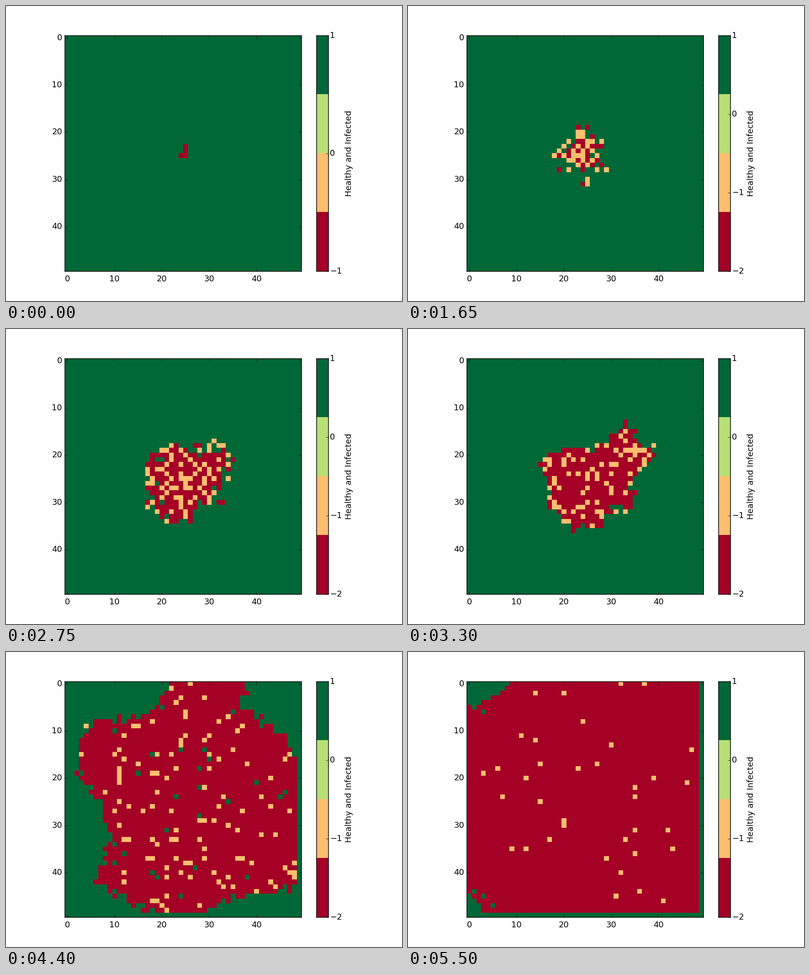
Write a matplotlib script that moves like this. It is 867 by 646 pixels and loops after 6.05 s.

```python
import numpy as np
import matplotlib.pyplot as plt
from matplotlib.animation import FuncAnimation
from matplotlib.path import Path

W, H, DPI = 867, 646, 128
N, STEPS, STEP_MS = 50, 11, 550
RED, TAN, GREEN = 0, 1, 3
PX = 72 / DPI
CMAP = plt.get_cmap("RdYlGn", 4)

xx, yy = np.meshgrid(np.arange(N), np.arange(N))
wall = (xx == N - 1) | (yy == N - 1)
rng = np.random.default_rng(7)

# Key points around the infected patch, in cell coordinates
SMALL = [(22, 17.6), (25.4, 17.6), (26.4, 21), (31.4, 20.6), (31.4, 24.4),
         (27.4, 25.5), (29.4, 28.4), (22.4, 33.4), (20.6, 28.6),
         (16.6, 27.4), (19.5, 22)]
MEDIUM = [(33.5, 13.6), (35.4, 17), (39.5, 20), (34.5, 25), (34, 31.6),
          (28.4, 32), (28, 35.4), (21.6, 35), (16.8, 31), (16.6, 25),
          (14.5, 21.6), (20, 18.5), (27, 18)]
LARGE = [(20, 11.5), (23, 13.6), (28.4, 11.6), (30, 16.5), (37.4, 14.6),
         (40.4, 20), (37, 28), (34.5, 34.4), (26, 37.4), (14, 34.4),
         (13.5, 25), (9.6, 19.5), (13, 14)]
WIDE = [(22.6, -1), (37.4, -1), (36.6, 5), (46.5, 12), (50, 20), (50, 41),
        (45, 44.4), (35, 44.4), (29, 48.4), (16, 48.4), (5.6, 42),
        (9, 34), (7, 24), (3, 20), (3, 11), (8, 7), (17, 7)]


def inside(outline):
    cells = np.column_stack([xx.ravel(), yy.ravel()])
    return Path(outline).contains_points(cells).reshape(N, N)


def blocks(*rects):
    mask = np.zeros((N, N), bool)
    for x, y, w, h in rects:
        mask[y:y + h, x:x + w] = True
    return mask


def depth(mask):
    """Signed distance to the patch edge, positive inside."""
    def nearest(m):
        py, px = np.nonzero(m)
        d = (xx.ravel()[:, None] - px) ** 2 + (yy.ravel()[:, None] - py) ** 2
        return np.sqrt(d.min(axis=1)).reshape(N, N)
    return nearest(~mask) - nearest(mask)


def paint(mask, weak):
    return np.where(mask, np.where(weak, TAN, RED), GREEN)


def scatter(field, share):
    """Ragged patch with a share of weakly infected cells."""
    chance, gap = rng.random((2, N, N))
    sick = (field + 3.2 * (gap - .5) > 0) & (gap > .012) & ~wall
    return paint(sick, chance < share)


def build():
    seed = blocks((25, 23, 1, 3), (24, 25, 1, 1))
    sprout = blocks((24, 22, 3, 1), (25, 23, 2, 1), (22, 24, 4, 1),
                    (19, 25, 7, 1), (24, 26, 3, 1), (25, 27, 2, 1),
                    (22, 23, 1, 1))
    strong = blocks((22, 23, 1, 1), (24, 24, 1, 1), (21, 25, 1, 1),
                    (25, 25, 1, 1))
    young = sprout & (xx > 22) & (yy > 22) & (yy < 27)
    full = (xx + 1.7 * yy > 9.5) & ((xx > 2) | (yy < 45))

    f2, f4, f6, f7, f8, f10 = map(depth, (
        sprout, *map(inside, (SMALL, MEDIUM, LARGE, WIDE)), full))
    stages = [((f2 + f4) / 2, .55), (f4, .47), ((f4 + f6) / 2, .32),
              (f6, .19), (f7, .2), (f8, .065), ((f8 + f10) / 2, .035)]
    corners = scatter(np.where(f10 > 2, N, f10), .0175)
    return [paint(seed, False), paint(young, ~strong), paint(sprout, ~strong),
            *(scatter(*stage) for stage in stages),
            np.where((corners == GREEN) & (f10 > 3) & ~wall, RED, corners)]


grids = build()

plt.rcParams.update({"font.family": "DejaVu Sans", "font.size": 18 * PX,
                     "axes.linewidth": 1.5 * PX})
fig = plt.figure(figsize=(W / DPI, H / DPI), dpi=DPI, facecolor="white")


def panel(x0, x1, top=64.5, bottom=581.3):
    ax = fig.add_axes([x0 / W, 1 - bottom / H, (x1 - x0) / W,
                       (bottom - top) / H])
    ax.tick_params(direction="in", length=6 * PX, width=.75 * PX)
    return ax


def show(ax, data, **kw):
    return ax.imshow(data, cmap=CMAP, vmin=0, vmax=3, aspect="auto",
                     interpolation="nearest", **kw)


ax = panel(129, 646.5)
image = show(ax, grids[0])
tens = range(0, N, 10)
ax.set_xticks(tens)
ax.set_yticks(tens, [str(v) for v in tens], va="center")
ax.tick_params(top=True, right=True)
ax.tick_params(axis="x", pad=8 * PX)
ax.tick_params(axis="y", pad=6 * PX)

bar = panel(680.3, 706)
show(bar, [[3], [2], [1], [0]], extent=(0, 1, 0, 1))
bar.set_xticks([])
bar.yaxis.tick_right()
bar.tick_params(axis="y", pad=3 * PX)
fig.text(751.3 / W, 1 - 323 / H, "Healthy and Infected", rotation=90,
         ha="center", va="center")


def draw(i):
    image.set_data(grids[i])
    low = -1 if i == 0 else -2
    levels = range(low, 2)
    bar.set_yticks([(v - low) / (1 - low) for v in levels],
                   [str(v).replace("-", "\u2212") for v in levels],
                   va="center")
    return [image]


anim = FuncAnimation(fig, draw, frames=STEPS, interval=STEP_MS, repeat=True)
plt.show()
```
